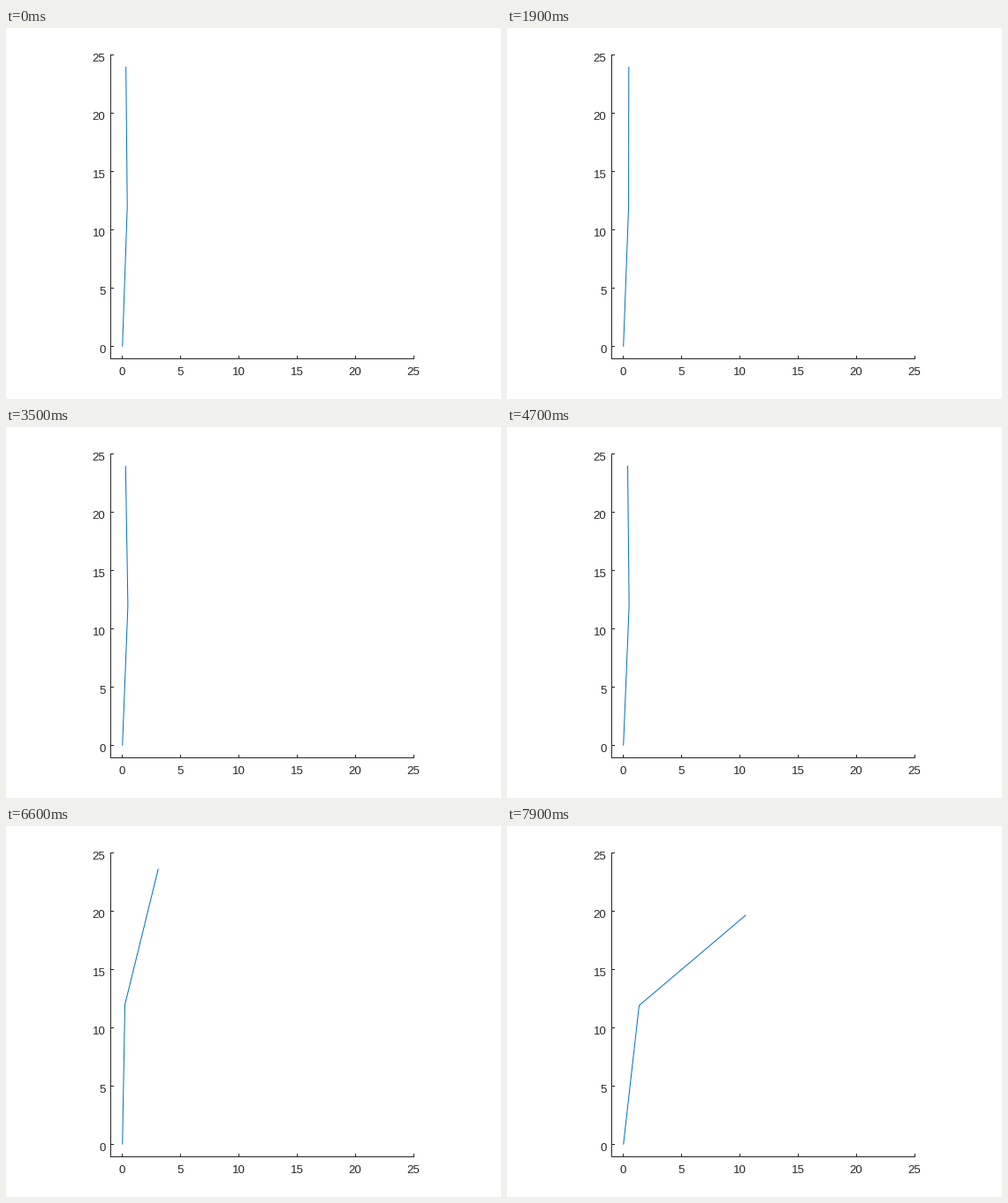
A matplotlib script that plays this animation: 560x420 px, repeating every 8 s.

```python
import numpy as np
import matplotlib
import matplotlib.pyplot as plt
from matplotlib.animation import FuncAnimation

matplotlib.rcParams["font.family"] = "Liberation Sans"

W, H, DPI = 560, 420, 100
PX = 72 / DPI                 # one pixel in points
STEP, FRAMES = 100, 80        # ms per frame, frames per loop
UNIT = 13.2                   # pixels per axis unit
BASE = (131.7, 360.6)
LINK = 12 * UNIT
INK, BLUE = "#262626", "#0072BD"

# sideways lean of the upper link: (seconds, pixels)
LEAN = [(0, -1.5), (1.9, 0.2), (3.5, -2.6), (4.7, -1.6),
        (5.8, 11.3), (6.3, 22.2), (7.3, 87), (7.9, 120.8)]


def elbow(t):
    """Slow drift, then a recoil followed by a swing to the right."""
    u = max(0, t - 5.4) ** 2
    return 137.2 + 0.2 * t + u * (0.93 * u - 4.1)


def lean(t):
    """Cubic Hermite curve through the key poses."""
    ts, xs = np.transpose(LEAN)
    slope = np.gradient(xs, ts)
    i = min(np.searchsorted(ts, t, side="right"), len(ts) - 1) - 1
    h = ts[i + 1] - ts[i]
    u = (t - ts[i]) / h
    v = 1 - u
    return (v * v * ((1 + 2 * u) * xs[i] + u * h * slope[i])
            + u * u * ((1 + 2 * v) * xs[i + 1] - v * h * slope[i + 1]))


def joints(t):
    x = elbow(t)
    xs = [BASE[0], x, x + lean(t)]
    rise = np.sqrt(LINK ** 2 - np.diff(xs) ** 2)
    return xs, BASE[1] - np.append(0, np.cumsum(rise))


fig = plt.figure(figsize=(W / DPI, H / DPI), dpi=DPI, facecolor="white")
ax = fig.add_axes([0, 0, 1, 1])
ax.set_xlim(0, W)
ax.set_ylim(H, 0)
ax.axis("off")


def rule(xs, ys):
    ax.plot(xs, ys, color=INK, lw=PX, solid_capstyle="butt", snap=False)


def label(x, y, text, ha):
    ax.text(x, y, text, ha=ha, va="baseline", color=INK, size=13.3 * PX)


rule([118.5, 462], [374.5, 374.5])
rule([118.5, 118.5], [30, 375])
for v in range(0, 26, 5):
    x = np.floor(131.6 + UNIT * v) + 0.5
    y = np.floor(360.7 - UNIT * v) + 0.5
    rule([x, x], [371, 374])
    rule([119, 122], [y, y])
    label(x - 0.4, 393, str(v), "center")
    label(112.4, y + 7.1, str(v), "right")

arm, = ax.plot([], [], color=BLUE, lw=PX, solid_capstyle="butt",
               solid_joinstyle="round")


def draw(i):
    arm.set_data(*joints(i * STEP / 1000))
    return arm,


anim = FuncAnimation(fig, draw, frames=FRAMES, interval=STEP, repeat=True,
                     repeat_delay=0, blit=False)
plt.show()
```
